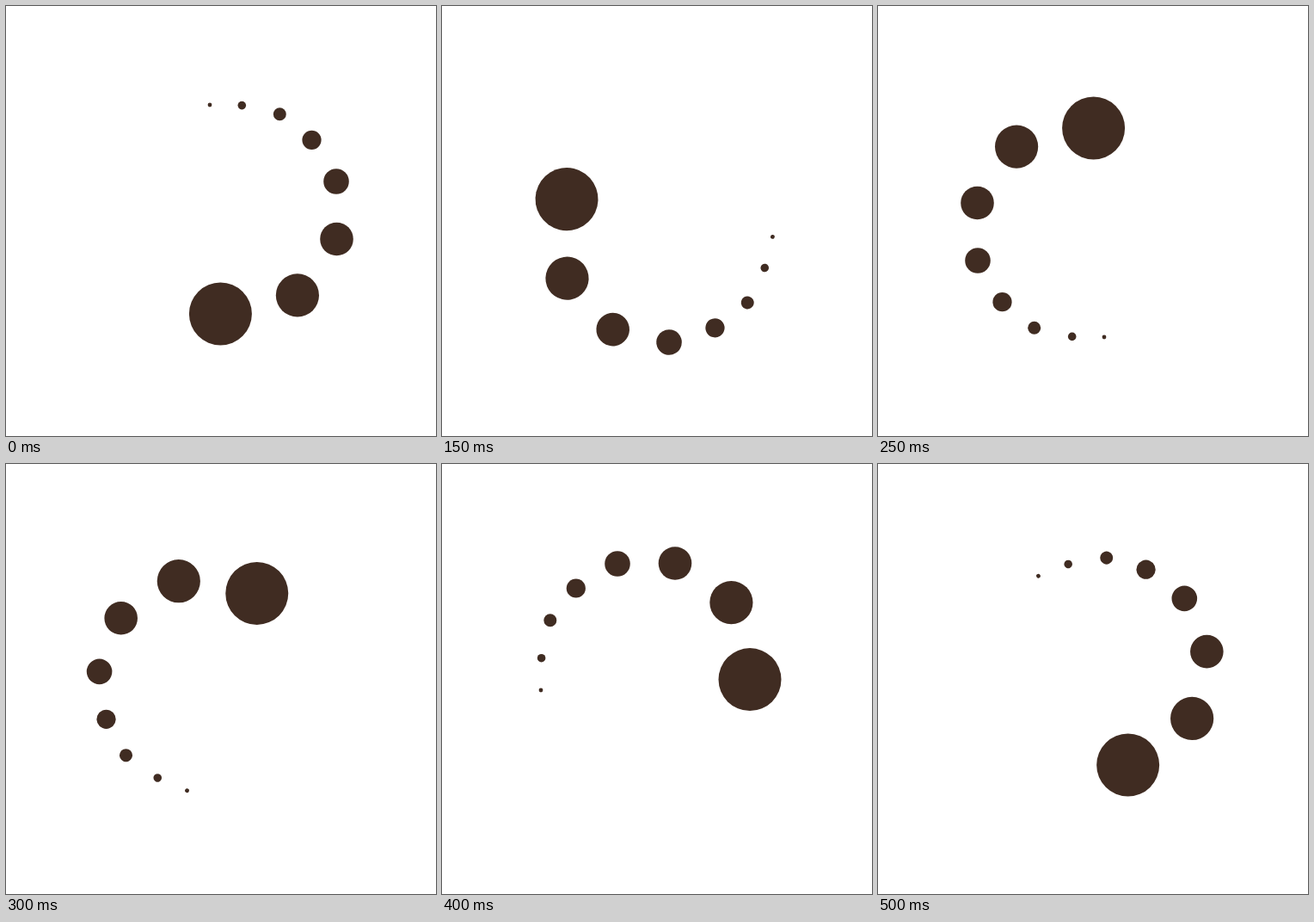
Write an HTML page with a canvas that moves like this. It is 500 by 500 pixels and loops after 0.55 s.

```html
<!DOCTYPE html>
<html>
<head>
<meta charset="utf-8">
<style>
  html, body { margin: 0; width: 100%; height: 100%; overflow: hidden; background: #fff; }
  canvas { display: block; }
</style>
</head>
<body>
<canvas id="stage" width="500" height="500"></canvas>
<script>
const ctx = document.getElementById('stage').getContext('2d');
const STEP = 50;
const STEPS = 11;
const TAU = Math.PI * 2;

// x, y from the centre, radius
const dots = [
  [-0.6, 108, 36.5],
  [88.9, 86.4, 25.1],
  [134.5, 21, 19.3],
  [134, -46, 14.8],
  [105.5, -94.2, 11.1],
  [68.3, -124.2, 7.5],
  [24.3, -134.4, 4.8],
  [-13, -135, 2.4],
];

// Progress in twelfths of a turn; the middle of the first half runs faster.
function phase(step) {
  if (step <= 2) return step;
  if (step < 5) return 2 + (step - 2) * 4 / 3;
  return step + 1;
}

// Each half turn speeds up and slows down gently.
function angleAt(step) {
  const halves = phase(step) / 6;
  const w = TAU * halves;
  return Math.PI * (halves - (0.315 * Math.sin(w) - 0.01 * Math.sin(2 * w)) / TAU);
}

function draw(time) {
  const step = Math.floor(time / STEP) % STEPS;
  ctx.setTransform(1, 0, 0, 1, 0, 0);
  ctx.fillStyle = '#fff';
  ctx.fillRect(0, 0, 500, 500);
  ctx.translate(250, 250);
  ctx.rotate(angleAt(step));
  ctx.fillStyle = '#402c22';
  for (const [x, y, r] of dots) {
    ctx.beginPath();
    ctx.arc(x, y, r, 0, TAU);
    ctx.fill();
  }
}

const start = performance.now();
function tick() {
  draw(performance.now() - start);
  requestAnimationFrame(tick);
}
tick();
</script>
</body>
</html>
```
